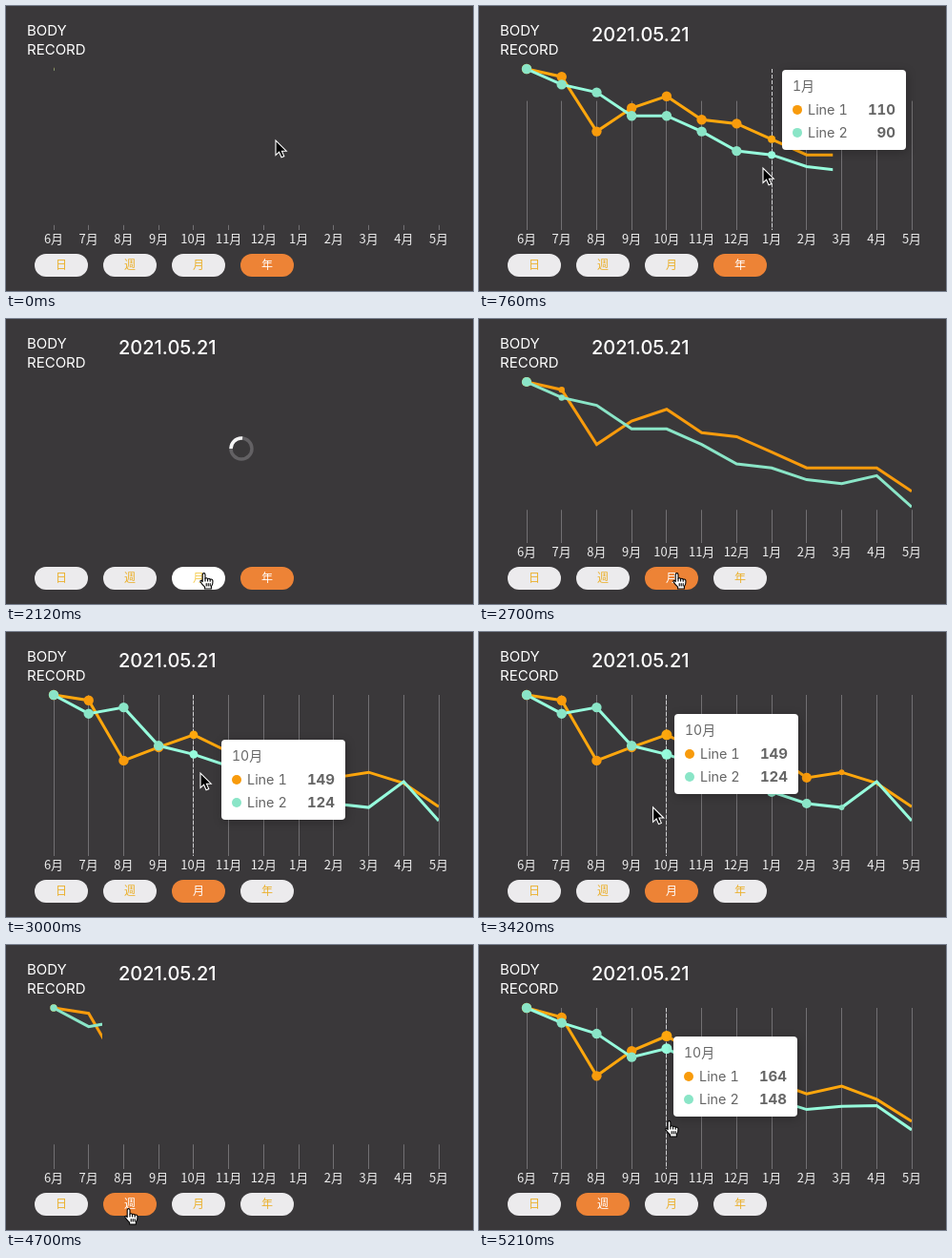
Write an HTML page with a canvas that moves like this. It is 490x299 px and loops after 5240 ms.

```html
<!DOCTYPE html>
<html lang="ja">
<head>
<meta charset="utf-8">
<title>Body record</title>
<style>
html, body { margin: 0; width: 100%; height: 100%; overflow: hidden; background: #3a383a; }
body { position: relative; font-family: Inter, "Noto Sans CJK JP", "Noto Sans CJK", sans-serif; }
canvas { position: absolute; left: 0; top: 0; width: 490px; height: 299px; }
#tip {
  position: absolute; left: 0; top: 0; width: 130px; height: 84px; border-radius: 4px;
  background: #fff; color: #666; box-shadow: 1px 2px 10px rgba(0, 0, 0, .25);
  font-size: 14.4px; line-height: 20px; font-variant-numeric: tabular-nums;
}
#tip div { position: absolute; white-space: nowrap; }
#tip .head { left: 11px; top: 7px; font-size: 14px; }
#tip .dot { left: 11px; width: 10px; height: 10px; border-radius: 5px; }
#tip .name { left: 27px; }
#tip .val { right: 11px; font-size: 15px; font-weight: 700; }
#cursor { position: absolute; left: 0; top: 0; overflow: visible; }
</style>
</head>
<body>
<canvas id="stage"></canvas>
<div id="tip"><div class="head"></div></div>
<svg id="cursor" width="20" height="22">
  <path id="arrow" d="M0 0V15.5L3.6 12.2L6 17.8L8.8 16.6L6.4 11.2H11.2Z" fill="#000" stroke="#fff" stroke-width="1.1"/>
  <g id="hand" fill="#fff" stroke="#000" stroke-width="1.1" stroke-linejoin="round" stroke-linecap="round">
    <path d="M3.2 9.6V2.2Q3.2 .6 4.6 .6Q6 .6 6 2.2V6.2Q7.4 5 8.6 6.6Q10 5.6 11.2 7.2Q13.6 6.6 14 8.8Q14.3 12 12.4 14.6V17H5.6V15.2Q2.6 12.4 1 9.8Q.6 8 2 8.2Z"/>
    <path d="M6 6.2V9M8.6 6.8V9M11.2 7.4V9.2M7.2 11.6V14M9.2 11.6V14M11.2 11.6V14" fill="none"/>
  </g>
</svg>
<script>
const LOOP = 5240, W = 490, H = 299;
const LEFT = 50, STEP = 404 / 11, TOP = 66, BASE = 230;
const CJK = '"Noto Sans CJK JP", "Noto Sans CJK", sans-serif';
const COLORS = ['#f89b0c', '#8ae5c7'], BRIGHT = ['#ffa70d', '#96fbdc'];
const MONTHS = [6, 7, 8, 9, 10, 11, 12, 1, 2, 3, 4, 5].map(m => m + '月');
const YEAR = [
  [200, 190, 120, 150, 165, 135, 130, 110, 90, 90, 90, 60],
  [200, 180, 170, 140, 140, 120, 95, 90, 75, 70, 80, 40]];
const MONTH = [
  [200, 193, 116, 133, 149, 127, 117, 126, 94, 101, 87, 57],
  [200, 176, 184, 135, 124, 109, 112, 76, 61, 56, 89, 39]];
const WEEK = [
  [200, 188, 113, 145, 164, 138, 126, 106, 90, 100, 83, 55],
  [200, 181, 167, 137, 148, 125, 104, 84, 70, 74, 75, 44]];

// each load draws the old data first, then morphs to the new data
const LOADS = [
  { start: 0, update: 1e9, end: 2040, from: YEAR, to: YEAR, active: 3 },
  { start: 2500, update: 2670, end: 4180, from: YEAR, to: MONTH, active: 2 },
  { start: 4580, update: 4750, end: LOOP, from: MONTH, to: WEEK, active: 1 }];
const HANDS = [[1830, 2800], [3790, LOOP]];
const HOVERS = [[1830, 2790, 2], [3790, 5000, 1]];
const TIPS = [[90, 1660], [2850, 3570], [5060, LOOP + 200]];
const CURSOR = [[0, 283, 141], [250, 283, 142], [760, 298, 170], [900, 297, 173], [1420, 170, 182],
  [1640, 176, 226], [1880, 203, 266], [2760, 203, 266], [3000, 204, 148], [3200, 204, 150],
  [3850, 124, 276], [4940, 124, 276], [5215, 195, 184]];
const TIP_PATH = [[0, 303, 162], [420, 304, 162], [640, 318, 66], [900, 318, 68], [1420, 194, 79],
  [1640, 196, 122], [2850, 224, 130], [3000, 226, 113], [3200, 224, 162], [3420, 205, 86],
  [3570, 170, 126], [5060, 160, 130], [5210, 204, 96]];

const $ = id => document.getElementById(id);
const canvas = $('stage'), ctx = canvas.getContext('2d'), tip = $('tip');
const clamp = v => Math.max(0, Math.min(1, v));
const smooth = u => u * u * (3 - 2 * u);
const cubicOut = u => 1 - (1 - u) ** 3;
const cubicInOut = u => u < .5 ? 4 * u ** 3 : 1 - 4 * (1 - u) ** 3;
const mix = (a, b, u) => a + (b - a) * u;
const inside = (list, t) => list.find(w => t >= w[0] && t < w[1]);
const px = i => LEFT + i * STEP;
const py = v => BASE - v * .82;

function along(path, t) {
  const i = path.findIndex(k => k[0] > t);
  if (i < 0) return path[path.length - 1].slice(1);
  const a = path[i - 1], b = path[i], u = smooth((t - a[0]) / (b[0] - a[0]));
  return [mix(a[1], b[1], u), mix(a[2], b[2], u)];
}

function label(str, x, y, font, color, align = 'center') {
  ctx.font = font;
  ctx.fillStyle = color;
  ctx.textAlign = align;
  ctx.fillText(str, x, y);
}

function stroke(color, width, points) {
  ctx.strokeStyle = color;
  ctx.lineWidth = width;
  ctx.beginPath();
  points.forEach(p => ctx.lineTo(p[0], p[1]));
  ctx.stroke();
}

function drawChart(t, load, hover) {
  const age = t - load.start;
  const updated = t >= load.update;
  const m = updated ? cubicInOut(clamp((t - load.update) / 300)) : 0;
  const p = clamp(Math.min(age, load.update - load.start) / 957);
  const grow = mix(p, 1, m);

  MONTHS.forEach((name, i) => {
    const x = Math.floor(px(i)) + .5;
    stroke('#727073', 1, [[x, mix(BASE, TOP, grow)], [x, 235]]);
    label(name, px(i), 249, '300 13px ' + CJK, '#ededed');
  });
  if (hover >= 0) {
    const x = Math.floor(px(hover)) + .5;
    ctx.setLineDash([4, 2]);
    stroke('#cfd0d2', 1, [[x, TOP], [x, 235]]);
    ctx.setLineDash([]);
  }

  const series = load.from.map((row, s) => row.map((v, i) => [px(i), py(mix(v, load.to[s][i], m))]));
  series.forEach((pts, s) => {
    ctx.save();
    ctx.beginPath();
    ctx.rect(LEFT, 0, updated ? 404 : 404 * p, BASE + 10);
    ctx.clip();
    stroke(hover >= 0 ? BRIGHT[s] : COLORS[s], 3, pts);
    ctx.restore();
    pts.forEach(([x, y], i) => {
      const size = cubicOut(clamp((age - 55 - i / 11 * 1000) / 200));
      if (!size) return;
      ctx.fillStyle = i === hover ? BRIGHT[s] : COLORS[s];
      ctx.beginPath();
      ctx.arc(x, y, 5.2 * size * (i === hover ? 1.06 : 1), 0, 7);
      ctx.fill();
    });
  });
}

function drawLoader(t) {
  const arc = (color, from, sweep) => {
    ctx.strokeStyle = color;
    ctx.lineWidth = 3.5;
    ctx.beginPath();
    ctx.arc(247, 136, 11, from, from + sweep);
    ctx.stroke();
  };
  arc('#636164', 0, Math.PI * 2);
  arc('#f4f4f4', Math.PI * (1 + (t - 2120) / 500), Math.PI * .53);
}

function drawButtons(t, active) {
  const hover = inside(HOVERS, t);
  ['日', '週', '月', '年'].forEach((name, i) => {
    const on = i === active, lit = hover && hover[2] === i;
    ctx.fillStyle = on ? '#ed8336' : lit ? '#fff' : '#ecebed';
    ctx.beginPath();
    ctx.roundRect(30 + i * 72, 260, 56, 24, 12);
    ctx.fill();
    label(name, 58 + i * 72, 276, '300 12px ' + CJK, on ? '#fff' : lit ? '#f5cc50' : '#ebb02c');
  });
}

function add(cls, top, text) {
  const el = document.createElement('div');
  el.className = cls;
  el.style.top = top + 'px';
  el.textContent = text;
  tip.append(el);
  return el;
}
const head = tip.querySelector('.head');
const values = COLORS.map((color, s) => {
  const y = 42 + s * 24;
  add('dot', y - 5, '').style.background = color;
  add('name', y - 10, 'Line ' + (s + 1));
  return add('val', y - 10, '');
});

function drawTip(t, span, load, hover) {
  tip.style.display = span ? 'block' : 'none';
  if (!span) return;
  const [x, y] = along(TIP_PATH, t);
  tip.style.transform = `translate(${x}px, ${y}px)`;
  tip.style.opacity = Math.min(clamp((t - span[0]) / 100), clamp((span[1] - t) / 100));
  head.textContent = MONTHS[hover];
  const data = t >= load.update ? load.to : load.from;
  values.forEach((el, s) => { el.textContent = data[s][hover]; });
}

function resize() {
  const ratio = window.devicePixelRatio || 1;
  canvas.width = W * ratio;
  canvas.height = H * ratio;
  ctx.scale(ratio, ratio);
}

function draw(t) {
  ctx.fillStyle = '#3a383a';
  ctx.fillRect(0, 0, W, H);
  label('BODY', 22, 31, '15px Inter, sans-serif', '#fff', 'left');
  label('RECORD', 22, 51, '15px Inter, sans-serif', '#fff', 'left');
  if (t >= 30) label('2021.05.21', 118, 37, '500 20px Inter, sans-serif', '#fff', 'left');

  const load = LOADS.filter(l => t >= l.start).pop();
  const [cx, cy] = along(CURSOR, t);
  const span = inside(TIPS, t);
  const hover = span ? Math.max(0, Math.min(11, Math.round((cx - LEFT) / STEP))) : -1;
  if (t < load.end) drawChart(t, load, hover);
  else drawLoader(t);
  drawButtons(t, load.active);
  drawTip(t, span, load, hover);

  const hand = !!inside(HANDS, t);
  $('hand').style.display = hand ? '' : 'none';
  $('arrow').style.display = hand ? 'none' : '';
  $('cursor').style.transform = `translate(${cx}px, ${cy}px)`;
}

resize();
window.addEventListener('resize', resize);
const origin = performance.now();
function frame() {
  draw((performance.now() - origin) % LOOP);
  requestAnimationFrame(frame);
}
draw(0);
requestAnimationFrame(frame);
</script>
</body>
</html>
```
